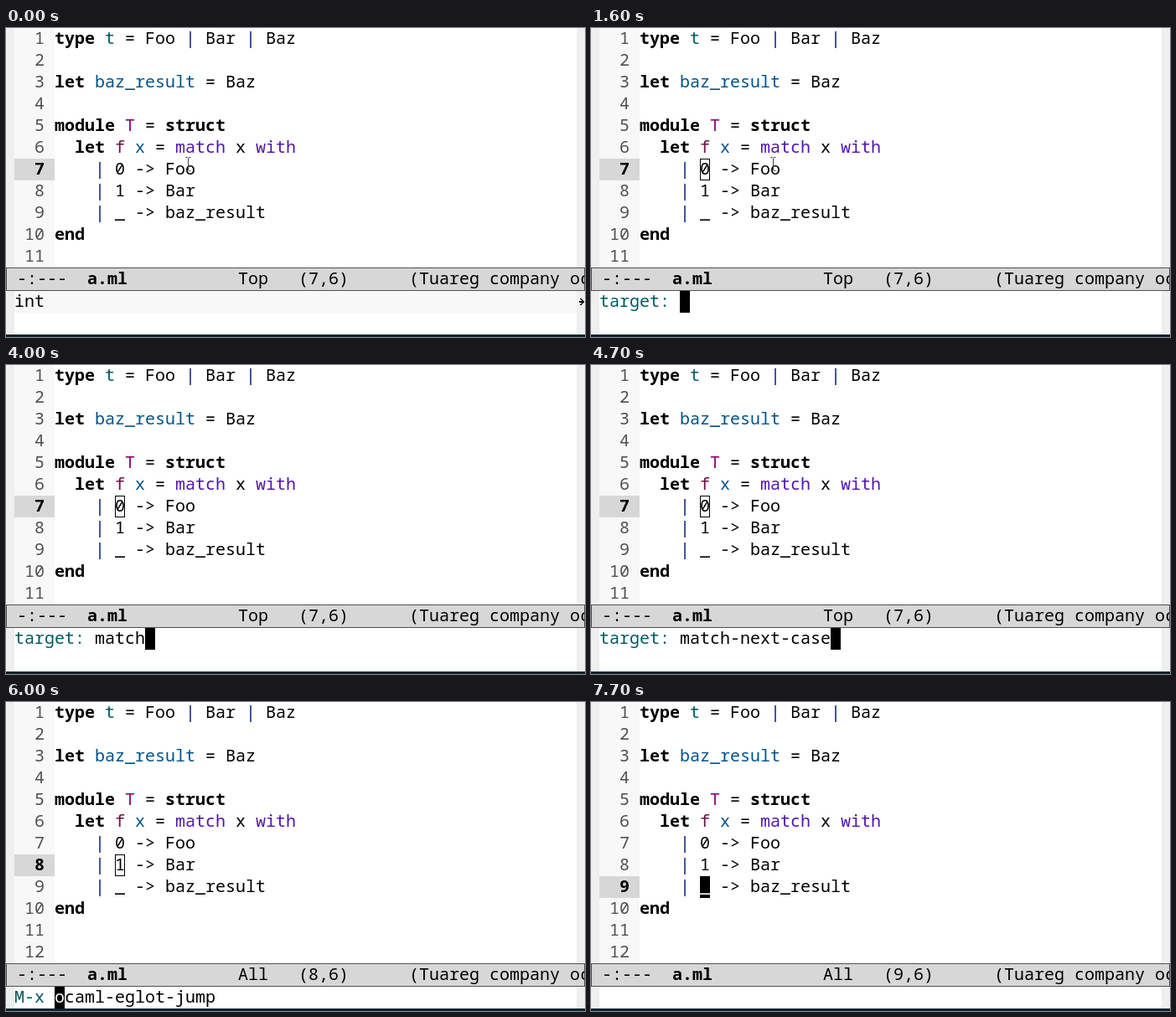
Animation, 691 px wide and 369 px high, one loop 8000 ms. Source, as an HTML page:

```html
<!DOCTYPE html>
<html lang="en">
<head>
<meta charset="utf-8">
<title>Editor session</title>
<style>
  html, body { margin: 0; width: 100%; height: 100%; overflow: hidden; background: #fff; }
  svg { display: block; }
  text { font: 20px "Noto Sans Mono", "DejaVu Sans Mono", monospace; white-space: pre; fill: #000; }
  .key, .now, .file { font-weight: bold; }
  .num { fill: #505050; }
  .num.now { fill: #000; }
  .type, .prompt { fill: #005a5f; }
  .var { fill: #00538b; }
  .mod { fill: #8f0075; }
  .fun { fill: #721045; }
  .ctl { fill: #5317ac; }
  .op { fill: #001970; }
  .inv { fill: #fff; }
</style>
</head>
<body>
<svg width="691" height="369" viewBox="0 0 691 369">
  <rect width="691" height="369" fill="#fff"/>
  <path d="M0 0h10v366h-10zM681 0h10v366h-10z" fill="#efefef"/>
  <rect id="gutter" x="10" width="48" fill="#f8f8f8"/>
  <rect id="current" x="10" width="48" height="26" fill="#d7d7d7"/>
  <g id="numbers"></g>
  <g id="code"></g>
  <g id="point">
    <rect id="block" x="130" width="12" height="26"/>
    <rect id="hollow" x="130.5" width="11" height="25" fill="none" stroke="#000"/>
    <text id="under" class="inv" x="130"></text>
  </g>
  <g id="mouse" fill="none">
    <path d="M214.500 154.500h2l1 1l1-1h2M217.500 155.500v14M214.500 170.500h2l1-1l1 1h2" stroke="#444"/>
  </g>
  <g id="modeline">
    <rect x=".5" y=".5" width="690" height="27" fill="#d7d7d7" stroke="#505050"/>
    <text class="file" x="97" y="20">a.ml</text>
    <text x="13" y="20">-:---</text>
    <text id="extent" x="277" y="20"></text>
    <text id="position" x="349" y="20"></text>
    <text x="481" y="20">(Tuareg company oc</text>
    <path d="M690.500 0v28" stroke="#505050"/>
  </g>
  <g id="echo">
    <rect x="10" y="314" width="671" height="26" fill="#f8f8f8"/>
    <text x="10" y="333">int</text>
    <path d="M685 323h2v1h1v1h1v1h1v2h-1v1h-1v1h-1v1h-2v-1h1v-1h1v-1h-3v-2h3v-1h-1v-1h-1z"/>
  </g>
  <g id="mini">
    <text id="prompt" class="prompt" x="10" y="19"></text>
    <text id="input" y="19"></text>
    <rect id="caret" width="12" height="26"/>
    <text id="caretChar" class="inv" y="19"></text>
  </g>
  <rect y="366" width="691" height="3" fill="#08242e"/>
</svg>
<script>
const LOOP = 8000, CELL = 12, ROW = 26, BASE = 19, LEFT = 58;
const $ = id => document.getElementById(id);
const show = (id, on) => $(id).setAttribute('display', on ? 'inline' : 'none');
const set = (id, name, value) => $(id).setAttribute(name, value);

// Each run is [text, class].
const lines = [
  [['type', 'key'], [' '], ['t', 'type'], [' = Foo '], ['|', 'op'], [' Bar '], ['|', 'op'], [' Baz']],
  [],
  [['let', 'key'], [' '], ['baz_result', 'var'], [' = Baz']],
  [],
  [['module', 'key'], [' '], ['T', 'mod'], [' = '], ['struct', 'key']],
  [['  '], ['let', 'key'], [' '], ['f', 'fun'], [' '], ['x', 'var'], [' = '],
   ['match', 'ctl'], [' x '], ['with', 'ctl']],
  [['    '], ['|', 'op'], [' 0 -> Foo']],
  [['    '], ['|', 'op'], [' 1 -> Bar']],
  [['    '], ['|', 'op'], [' _ -> baz_result']],
  [['end', 'key']], [], []
];

function addText(parent, x, y, str, cls = '') {
  const el = document.createElementNS('http://www.w3.org/2000/svg', 'text');
  el.setAttribute('x', x);
  el.setAttribute('y', y);
  el.setAttribute('class', cls);
  el.textContent = str;
  return $(parent).appendChild(el);
}

const numbers = lines.map((runs, i) => {
  const y = i * ROW + BASE;
  let x = LEFT;
  for (const [str, cls] of runs) {
    if (str.trim()) addText('code', x, y, str, cls);
    x += str.length * CELL;
  }
  return addText('numbers', 10, y, String(i + 1).padStart(3), 'num');
});

const MX = 'M-x ', ASK = 'target: ', CMD = 'ocaml-eglot-jump', GOAL = 'match-next-case';
const typed = (t, n) => [t, ASK, GOAL.slice(0, n), n];

// [start, prompt, input, caret column or -1 when blinked off]
const steps = [
  [0, '', '', -1],
  [400, MX, '', 0], [800, MX, CMD, 0], [1300, MX, CMD, -1],
  [1600, ASK, '', 0], [2100, ASK, '', -1], [2600, ASK, '', 0], [3100, ASK, '', -1],
  typed(3500, 1), typed(3600, 2), typed(3800, 3), typed(3900, 4), typed(4000, 5),
  typed(4200, 6), typed(4500, 7), typed(4700, 15),
  [5100, '', '', -1],
  [5500, MX, '', 0], [6000, MX, CMD, 0],
  [6500, ASK, '', 0], [7000, ASK, '', -1], [7100, ASK, GOAL, 0], [7600, ASK, GOAL, -1],
  [7700, '', '', -1]
];

function draw([t, prompt, input, col]) {
  const line = t < 5100 ? 7 : t < 7700 ? 8 : 9;
  const rows = t < 5100 ? 11 : 12;
  const top = (line - 1) * ROW;
  const solid = !prompt && t > 0;

  set('gutter', 'height', rows * ROW);
  set('current', 'y', top);
  numbers.forEach((el, i) => {
    el.setAttribute('class', i + 1 === line ? 'num now' : 'num');
    el.setAttribute('display', i < rows ? 'inline' : 'none');
  });

  set('block', 'y', top);
  set('hollow', 'y', top + 0.5);
  set('under', 'y', top + BASE);
  $('under').textContent = '01_'[line - 7];
  show('block', solid);
  show('under', solid);
  show('hollow', prompt);
  show('mouse', t < 3500);
  show('echo', t === 0);

  set('modeline', 'transform', `translate(0 ${rows * ROW})`);
  $('extent').textContent = rows === 11 ? 'Top' : 'All';
  $('position').textContent = `(${line},6)`;

  const x = 10 + prompt.length * CELL;
  set('mini', 'transform', `translate(0 ${rows * ROW + 28})`);
  $('prompt').textContent = prompt;
  $('input').textContent = input;
  set('input', 'x', x);
  set('caret', 'x', x + col * CELL);
  set('caretChar', 'x', x + col * CELL);
  $('caretChar').textContent = input[col] || '';
  show('caret', col >= 0);
  show('caretChar', col >= 0);
}

let shown;
function tick() {
  const now = performance.now() % LOOP;
  const step = steps.findLast(s => s[0] <= now);
  if (step !== shown) draw(shown = step);
  requestAnimationFrame(tick);
}
tick();
</script>
</body>
</html>
```
